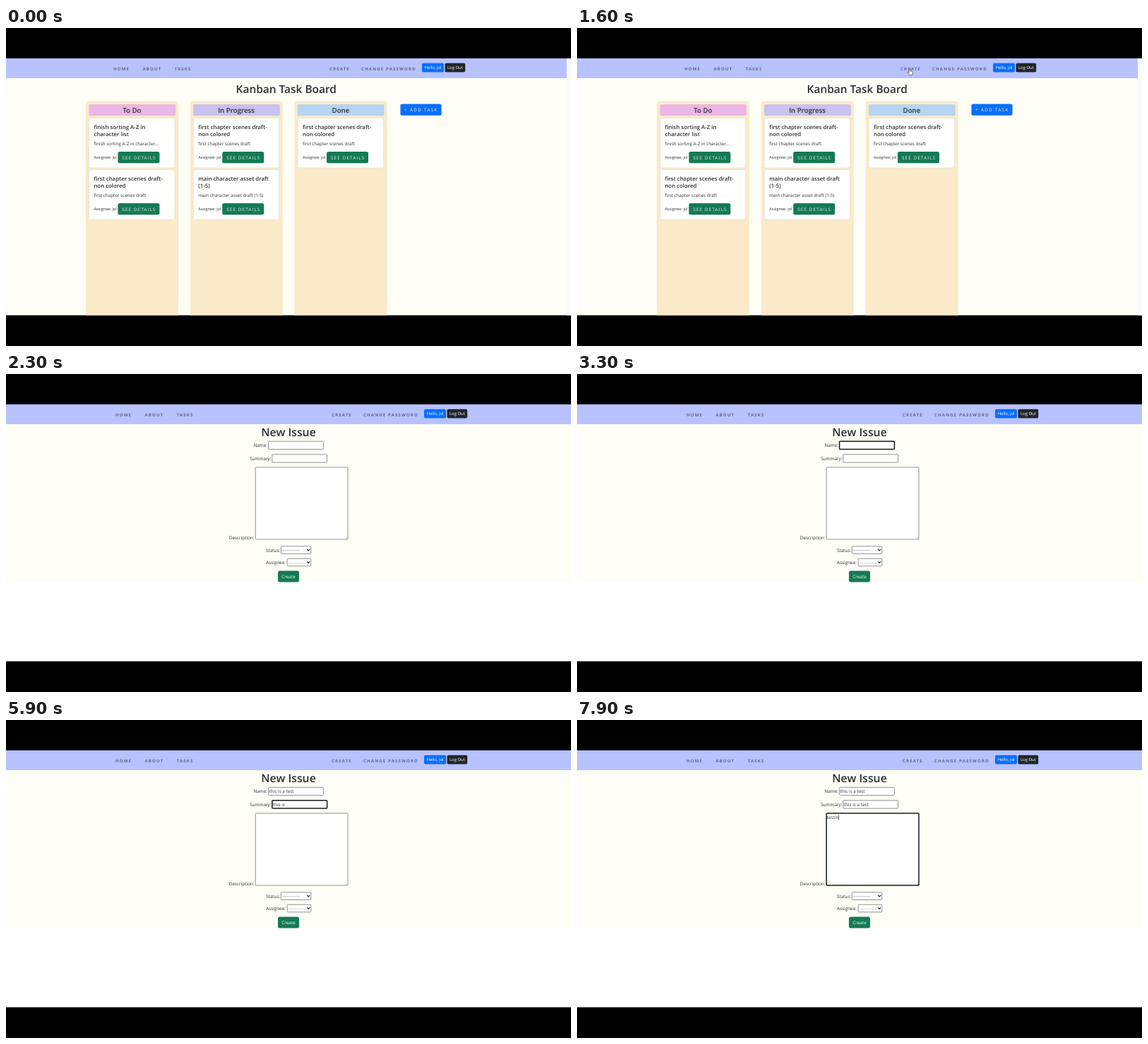
An HTML page that plays this animation: 800x450 px, repeating every 8 s.

```html
<!DOCTYPE html>
<html lang="en">
<head>
<meta charset="utf-8">
<title>Kanban Task Board</title>
<style>
  html, body { margin: 0; width: 100%; height: 100%; overflow: hidden; background: #000; }
  svg { display: block; width: 100%; height: 100%; }
  text { font: 6.36px "Open Sans", "Noto Sans", sans-serif; fill: #2b2f33; white-space: pre; text-rendering: geometricPrecision; }
  .mid { text-anchor: middle; }
  .nav { font-size: 6px; font-weight: 700; letter-spacing: 1.2px; fill: #626783; }
  .title { font-size: 15.45px; font-weight: 600; }
  .issue { font-size: 15.8px; font-weight: 600; }
  .head { font-size: 9.7px; font-weight: 600; }
  .name { font-size: 7.85px; font-weight: 600; }
  .tiny { font-size: 5.6px; }
  .badge { font-size: 5.95px; fill: #fff; }
  .spaced { font-size: 6.2px; letter-spacing: 1.2px; fill: #eef7f2; }
  .dash { font-size: 6.3px; letter-spacing: .7px; }
  .white { fill: #fff; }
  .field { fill: #fff; stroke: #777; stroke-width: .8; }
  .field.on { stroke: #16181c; stroke-width: 1.5; }
</style>
</head>
<body>
<svg id="stage" viewBox="0 0 800 450" preserveAspectRatio="none"></svg>
<script>
const NS = "http://www.w3.org/2000/svg";
const stage = document.getElementById("stage");
const USER = "jol", GREEN = "#157a54", GREEN_HOVER = "#10633f", CREAM = "#fefef6";

function add(parent, tag, attrs = {}, content) {
  const el = document.createElementNS(NS, tag);
  for (const key in attrs) el.setAttribute(key, attrs[key]);
  if (content !== undefined) el.textContent = content;
  return parent.appendChild(el);
}
const box = (p, x, y, width, height, fill, rx = 0, more = {}) =>
  add(p, "rect", { x, y, width, height, fill, rx, ...more });
const label = (p, x, y, content, cls = "") =>
  add(p, "text", { x, y, class: cls }, content);

function navbar(page, shift, width) {
  box(page, 0, 43, width, 28, "#b7c2ff");
  const g = add(page, "g", { transform: `translate(${shift} 0)` });
  [[152, "HOME"], [193.5, "ABOUT"], [238.7, "TASKS"], [458, "CREATE"], [503, "CHANGE PASSWORD"]]
    .forEach(([x, word]) => label(g, x, 59.6, word, "nav"));
  box(g, 589, 49.8, 31, 12.8, "#0b6efb", 1.8);
  label(g, 604.6, 58.3, "Hello, " + USER, "badge mid");
  box(g, 621.5, 49.8, 28.7, 12.8, "#212529", 1.8);
  label(g, 635.9, 58.3, "Log Out", "badge mid");
}

// Task board
const board = add(stage, "g");
const buttons = [];
box(board, 0, 43, 800, 363.5, CREAM);
box(board, 794, 43, 6, 363.5, "#fbfbfb");
navbar(board, 0, 794);
label(board, 396.8, 92, "Kanban Task Board", "title mid");

function card(x, y, [line1, line2, note]) {
  box(board, x + 4.5, y, 121.3, 70.5, "#fff", 2.5, { stroke: "#e0dcd2", "stroke-width": .6 });
  label(board, x + 11.4, y + 15.5, line1, "name");
  label(board, x + 11.4, y + 25.6, line2, "name");
  label(board, x + 11.4, y + 38.1, note);
  label(board, x + 11.4, y + 57.4, "Assignee: " + USER, "tiny");
  const el = box(board, x + 45.4, y + 47.5, 59, 16.2, GREEN, 2.5);
  buttons.push({ el, x: x + 45.4, y: y + 47.5 });
  label(board, x + 51.4, y + 58, "SEE DETAILS", "spaced");
}

const chapter = ["first chapter scenes draft-", "non colored", "first chapter scenes draft"];
const sorting = ["finish sorting A-Z in", "character list", "finish sorting A-Z in character..."];
const asset = ["main character asset draft", "(1-5)", "main character asset draft (1-5)"];
[
  [113, "To Do", "#ecb6e6", [sorting, chapter]],
  [260.8, "In Progress", "#c9c1f0", [chapter, asset]],
  [408.6, "Done", "#b6d5f3", [chapter]]
].forEach(([x, head, color, tasks]) => {
  add(board, "path", { d: `M${x} 406.5V107.5q0-4 4-4h123q4 0 4 4v299z`, fill: "#faeaca" });
  box(board, x + 4.3, 108, 122.7, 16, color, 2);
  label(board, x + 65.3, 119.7, head, "head mid");
  tasks.forEach((task, i) => card(x, 127.5 + 73 * i, task));
});
box(board, 558.4, 107.6, 58.2, 16.1, "#0b6efb", 2.5);
label(board, 564, 118, "+ ADD TASK", "spaced").style.letterSpacing = "1.4px";

// New issue form
const form = add(stage, "g");
box(form, 0, 43, 800, 363.5, "#fff");
box(form, 0, 43, 800, 251.5, CREAM);
navbar(form, 3, 800);
label(form, 400, 88, "New Issue", "issue mid");
[[350.4, 102.9, "Name:"], [345.2, 121.8, "Summary:"], [315.8, 234.2, "Description:"],
 [368, 251.5, "Status:"], [368, 268.9, "Assignee:"]].forEach(row => label(form, ...row));

const field = (x, y, w, h) => add(form, "rect", { x, y, width: w, height: h, rx: 1, class: "field" });

// keys: [time, characters typed by then]
const inputs = [
  { rect: field(371.6, 95.3, 77.8, 11.3), x: 372.6, y: 103, from: 2800, to: 4600, value: "this is a test",
    keys: [[3500, 1], [3600, 2], [3700, 4], [3900, 5], [4000, 6], [4100, 7], [4200, 9], [4400, 12], [4500, 14]] },
  { rect: field(376.8, 113.8, 77.8, 11.3), x: 377.8, y: 121.7, from: 4600, to: 6700, value: "this is a test",
    keys: [[4800, 1], [4900, 2], [5000, 4], [5200, 8], [6100, 9], [6300, 11], [6400, 12], [6500, 14]] },
  { rect: field(353.2, 132, 130.8, 102), x: 353.8, y: 140, from: 6700, to: 8000, value: "testin",
    keys: [[7500, 2], [7600, 4], [7800, 5], [7900, 6]] }
];
inputs.forEach(input => input.text = label(form, input.x, input.y, ""));
add(form, "path", { d: "M480.5 233l2.6-2.6M482 233l1.1-1.1", stroke: "#888", "stroke-width": .5 });

[[389.4, 243.8, 42.4, "#222"], [398.2, 261.2, 33.6, "#777"]].forEach(([x, y, w, color]) => {
  field(x, y, w, 10.6);
  label(form, x + 2.2, y + 7.6, "---------", "dash").style.fill = color;
  add(form, "path", { d: `M426.2 ${y + 4.2}l2 2 2-2`, fill: "none", stroke: "#222", "stroke-width": 1.1 });
});
box(form, 385, 278.5, 30, 16, GREEN, 2.5);
label(form, 400, 288.9, "Create", "white mid");
const caret = box(form, 0, 0, .7, 7.2, "#222");

// Mouse pointer
const outline = { fill: "#fff", stroke: "#222", "stroke-width": .6, "stroke-linejoin": "round" };
const pointers = {
  arrow: add(stage, "path", { d: "M0 0v8.5l2-1.9 1.4 3 1.3-.6-1.4-2.9h2.7z", ...outline }),
  hand: add(stage, "path", { d: "M-.8.6q.8-1.2 1.6 0v3.2l3 .8q.8.3.6 1.2l-.7 3.8h-4l-2.6-3.5q0-1 1-.7l1.1.8z", ...outline }),
  beam: add(stage, "path", { d: "M-1.6-3.6h3.2M0-3.6v7.2M-1.6 3.6h3.2", stroke: "#555", "stroke-width": .6, fill: "none" })
};
const route = [
  [100, 785, 215], [600, 207, 184], [900, 207, 184], [1400, 471, 57],
  [1600, 471, 57], [2100, 419, 140.5], [2400, 419, 137], [2800, 412, 101]
];

function pointAt(t) {
  const i = Math.max(1, route.findIndex(p => p[0] >= t));
  const [t0, x0, y0] = route[i - 1], [t1, x1, y1] = route[i];
  const k = (t - t0) / (t1 - t0), e = k * k * (3 - 2 * k);
  return [x0 + (x1 - x0) * e, y0 + (y1 - y0) * e];
}

function drawPointer(t) {
  const shown = t >= 100 && t < 2800 && t !== 2300;
  const [x, y] = shown ? pointAt(t) : [-99, -99];
  const onButton = b => x > b.x && x < b.x + 59 && y > b.y && y < b.y + 16.2;
  buttons.forEach(b => b.el.setAttribute("fill", onButton(b) ? GREEN_HOVER : GREEN));
  const onLink = x > 456 && x < 488 && y > 50 && y < 64;
  const kind = t >= 2000 ? "beam" : onLink || buttons.some(onButton) ? "hand" : "arrow";
  for (const name in pointers) {
    pointers[name].style.display = shown && name === kind ? "" : "none";
    pointers[name].setAttribute("transform", `translate(${x} ${y})`);
  }
}

function drawForm(t) {
  let caretOn = false;
  for (const input of inputs) {
    const typed = input.keys.filter(([at]) => at <= t);
    const [last, count] = typed.length ? typed[typed.length - 1] : [input.from, 0];
    const focused = t >= input.from && t < input.to;
    input.text.textContent = input.value.slice(0, count);
    input.rect.classList.toggle("on", focused);
    if (focused) {
      caretOn = Math.floor((t - last) / 500) % 2 === 0;
      caret.setAttribute("x", input.x + (count ? input.text.getComputedTextLength() : 0));
      caret.setAttribute("y", input.y - 5.9);
    }
  }
  caret.style.display = caretOn ? "" : "none";
}

const start = performance.now();
function frame() {
  const t = Math.floor((performance.now() - start) % 8000 / 100) * 100;
  const onForm = t >= 2300;
  board.style.display = onForm ? "none" : "";
  form.style.display = onForm ? "" : "none";
  if (onForm) drawForm(t);
  drawPointer(t);
  requestAnimationFrame(frame);
}
frame();
</script>
</body>
</html>
```
